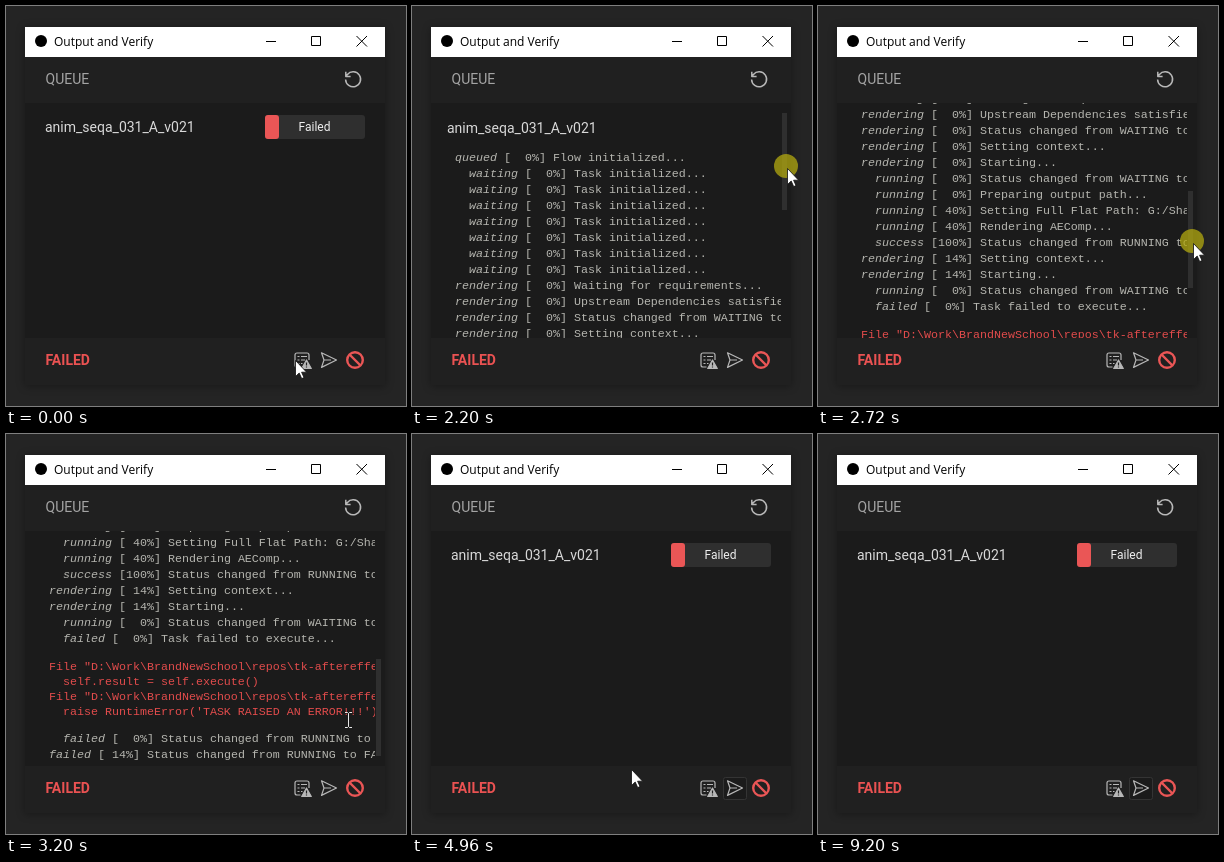
Write an HTML page that moves like this. It is 400 px wide and 400 px high and loops after 9.32 s.

```html
<!DOCTYPE html>
<html lang="en">
<head>
<meta charset="utf-8">
<title>Render queue</title>
<style>
  html, body { margin: 0; width: 100%; height: 100%; overflow: hidden; background: #242424; }
  svg { display: block; }
  #stage { width: 400px; height: 400px; }
  #window { filter: drop-shadow(0 1px 4px rgba(0, 0, 0, .35)); }
  text { font: 14px Roboto, sans-serif; fill: #d9d9d9; white-space: pre; }
  #log .line { font: 11.667px "Liberation Mono", monospace; fill: #b6b6b0; }
  #log .error { fill: #e24c4c; }
  .status { font-style: italic; }
  .icon { fill: none; stroke: #b8b8b8; stroke-width: 1.2; stroke-linejoin: round; }
  .box { fill: #1b1b1b; stroke: #343434; }
</style>
</head>
<body>
<svg id="stage" viewBox="0 0 400 400">
  <rect width="400" height="400" fill="#242424"/>
  <rect id="window" x="19" y="21" width="360" height="358" fill="#1b1b1b"/>

  <!-- title bar -->
  <rect x="19" y="21" width="360" height="30" fill="#fff"/>
  <circle cx="35" cy="35" r="6" fill="#000"/>
  <text x="48" y="40" style="font: 12px 'Open Sans', sans-serif; fill: #000">Output and Verify</text>
  <path d="M260 35.5h10M305.5 30.5h9v9h-9zM350.5 30l10.5 10.5M361 30l-10.5 10.5" fill="none" stroke="#000"/>

  <!-- header -->
  <rect x="19" y="51" width="360" height="46" fill="#202020"/>
  <text x="39.5" y="78" style="fill: #a4a4a4">QUEUE</text>
  <path class="icon" style="stroke-width: 1.5" d="M339.6 73.5A7.5 7.5 0 1 0 341.4 68.4L339.8 70.3M339.8 65.8V70.6H344.6"/>
  <g id="banner">
    <rect x="19" y="51" width="360" height="46" fill="#2d9cdb"/>
    <circle cx="49" cy="74" r="8" fill="none" stroke="#e4f2fb" stroke-width="1.2"/>
    <path d="M49 72.5v5.5M49 69.5v1.6" stroke="#e4f2fb" stroke-width="1.4"/>
    <text x="65" y="79" style="fill: #eef7fc">Error report sent!</text>
  </g>

  <g id="queue">
    <text x="39" y="126">anim_seqa_031_A_v021</text>
    <rect x="259" y="109" width="100" height="24" rx="3" fill="#2f2f2f"/>
    <rect x="259" y="109" width="14" height="24" rx="3" fill="#ea5656"/>
    <text x="308.5" y="125" text-anchor="middle" style="font-size: 12px; fill: #eee">Failed</text>
  </g>

  <g id="logView">
    <svg x="19" y="97" width="350" height="235" viewBox="19 97 350 235">
      <g id="log"><text x="35" y="127">anim_seqa_031_A_v021</text></g>
    </svg>
    <rect id="thumb" x="370" width="5" height="97" fill="#2f2f2f"/>
  </g>

  <!-- footer -->
  <rect x="19" y="332" width="360" height="47" fill="#202020"/>
  <text x="39.5" y="359" style="font-weight: 700; fill: #ea5252">FAILED</text>
  <rect id="logBox" class="box" x="285.5" y="343.5" width="23" height="22" rx="2"/>
  <rect id="sendBox" class="box" x="311.5" y="343.5" width="23" height="22" rx="2"/>
  <g class="icon">
    <path d="M294.5 361H291a2 2 0 0 1-2-2V349a2 2 0 0 1 2-2H301a2 2 0 0 1 2 2V354"/>
    <path d="M291.5 350.5h2M295 350.5h6M291.5 354h2M295 354h4M291.5 357.5h2M295 357.5h1.5"/>
    <path d="M300.5 354L305.3 362.5H295.7Z" fill="#b8b8b8"/>
    <path d="M300.5 356.5v3M300.5 360.4v1.2" stroke="#202020"/>
    <path d="M315.5 346.8L330.5 354L315.5 361.4L318 354ZM318 354H325"/>
  </g>
  <g fill="none" stroke="#ea5656" stroke-width="2.4">
    <circle cx="349" cy="354" r="7.8"/>
    <path d="M343.5 348.5l11 11"/>
  </g>

  <g id="pointer">
    <circle id="press" cx="-1" cy="-2" r="12" fill="#b3aa10" opacity=".75"/>
    <path id="arrow" d="M.5 .5V16.5L4.2 13L6.7 18.6L9 17.6L6.6 12.2H11.6Z" fill="#fff" stroke="#111" stroke-width=".8"/>
    <path id="beam" d="M-3 -7.5H-.5L.5 -6.5L1.5 -7.5H4M.5 -6.5V6.5M-3 7.5H-.5L.5 6.5L1.5 7.5H4" fill="none" stroke="#e8e8e8"/>
  </g>
</svg>
<script>
const LOOP = 9320, STEP = 40;
const LOG_OPENS = 1120, LOG_CLOSES = 4720;
const DRAG = [2190, 3060], SCROLL = 283, THUMB_TRAVEL = 118;
const CLICKS = [LOG_OPENS, LOG_CLOSES, 6480].map(end => end - STEP);

const $ = id => document.getElementById(id);
const show = (id, on) => $(id).setAttribute("visibility", on ? "visible" : "hidden");

const waiting = "  waiting [  0%] Task initialized...\n".repeat(7);
const logText = String.raw`queued [  0%] Flow initialized...
${waiting}rendering [  0%] Waiting for requirements...
rendering [  0%] Upstream Dependencies satisfied
rendering [  0%] Status changed from WAITING to RUNNING
rendering [  0%] Setting context...
rendering [  0%] Starting...
  running [  0%] Status changed from WAITING to RUNNING
  running [  0%] Preparing output path...
  running [ 40%] Setting Full Flat Path: G:/Shared
  running [ 40%] Rendering AEComp...
  success [100%] Status changed from RUNNING to SUCCESS
rendering [ 14%] Setting context...
rendering [ 14%] Starting...
  running [  0%] Status changed from WAITING to RUNNING
  failed [  0%] Task failed to execute...

File "D:\Work\BrandNewSchool\repos\tk-aftereffects
  self.result = self.execute()
File "D:\Work\BrandNewSchool\repos\tk-aftereffects
  raise RuntimeError('TASK RAISED AN ERROR!!!')

  failed [  0%] Status changed from RUNNING to FAILED
failed [ 14%] Status changed from RUNNING to FAILED`;

function svgNode(name, attributes, ...children) {
  const node = document.createElementNS("http://www.w3.org/2000/svg", name);
  for (const key in attributes) node.setAttribute(key, attributes[key]);
  node.append(...children);
  return node;
}

let lineY = 155;
for (const line of logText.split("\n")) {
  const [, status, message] = line.match(/^( *\w+(?= \[))?(.*)$/);
  const kind = status ? "line" : "line error";
  $("log").append(svgNode("text", { class: kind, x: 43, y: lineY },
    svgNode("tspan", { class: "status" }, status || ""), message));
  lineY += status ? 16 : message ? 15 : 12;
}

const start = [289, 354], logButton = [300, 354], aside = [219, 335];
const thumbTop = [375, 162], thumbBottom = [375, 276], errorEnd = [342, 286], errorStart = [33, 235];
const sendButton = [327, 351], below = [327, 299], outside = [344, 420];

// Each move eases the pointer from wherever it is to a place
const moves = [
  [0, 40, logButton], [1080, 1280, aside], [1400, 2000, thumbTop],
  [...DRAG, thumbBottom], [3060, 3200, errorEnd], [3200, 3960, errorStart],
  [4120, 4640, logButton], [4720, 4960, aside], [4960, 5280, sendButton],
  [7160, 7440, below], [9040, 9200, outside]
];

function ease(t, from, to) {
  const p = Math.min(1, Math.max(0, (t - from) / (to - from)));
  return p * p * (3 - 2 * p);
}
const pointerAt = t => moves.reduce(
  (at, [from, to, place]) => at.map((v, i) => v + (place[i] - v) * ease(t, from, to)), start);

function draw() {
  const now = performance.now() % LOOP;
  const t = now - now % STEP;
  const [x, y] = pointerAt(t).map(Math.round);
  const scrolled = ease(t, ...DRAG);
  const logOpen = t >= LOG_OPENS && t < LOG_CLOSES;
  const overText = logOpen && x < 369 && y > 97 && y < 332;
  const dragging = t >= 2160 && t < 3080;

  show("queue", !logOpen);
  show("logView", logOpen);
  $("log").setAttribute("transform", `translate(0 ${-Math.round(scrolled * SCROLL)})`);
  $("thumb").setAttribute("y", Math.round(107 + scrolled * THUMB_TRAVEL));
  $("banner").setAttribute("opacity", ease(t, 7040, 7200) - ease(t, 8720, 8840));

  show("logBox", t > 0 && x >= 285 && x < 309 && y >= 343 && y < 366);
  show("sendBox", t >= LOG_CLOSES);
  $("pointer").setAttribute("transform", `translate(${x} ${y})`);
  show("press", dragging || CLICKS.some(click => t >= click && t < click + STEP));
  show("arrow", !overText);
  show("beam", overText);
  requestAnimationFrame(draw);
}
draw();
</script>
</body>
</html>
```
